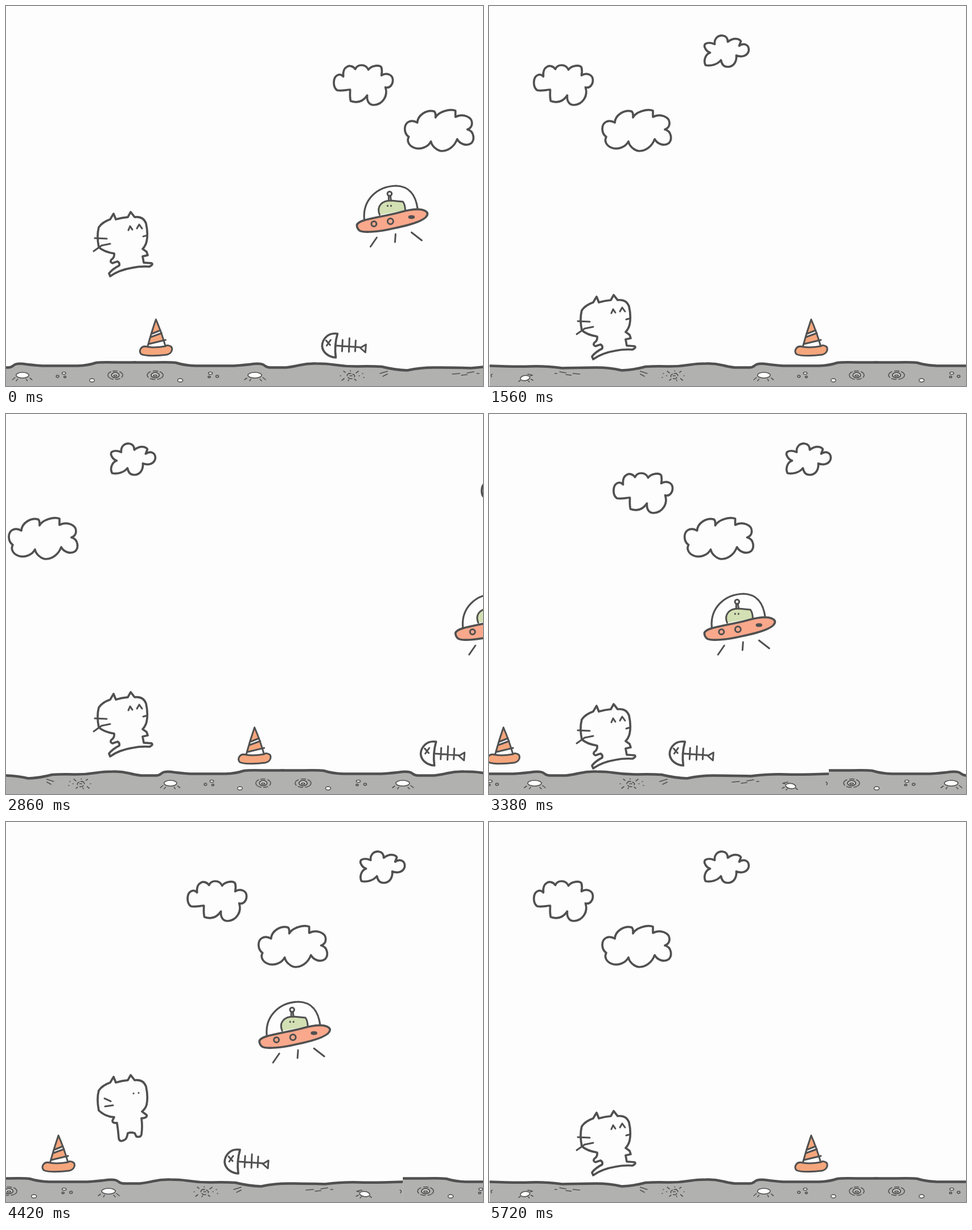
Write an HTML page that moves like this. It is 838 px wide and 668 px high and loops after 5850 ms.

```html
<!DOCTYPE html>
<html lang="en">
<head>
<meta charset="utf-8">
<title>Moon run</title>
<style>
  html, body { margin: 0; width: 838px; height: 668px; overflow: hidden; background: #fdfdfd; }
  svg { display: block; }
  .ink { fill: none; stroke: #505050; stroke-width: 3.7; stroke-linecap: round; stroke-linejoin: round; }
  .fine { stroke-width: 3; }
  .thin { stroke-width: 1.6; }
  .paper { fill: #fdfdfd; }
  .orange { fill: #f5a67c; }
  .red { fill: #f9a88c; }
  .green { fill: #d3e0b3; }
  .dark { fill: #505050; }
  .soil { fill: #b1b1b0; }
</style>
</head>
<body>
<svg width="838" height="668" viewBox="0 0 838 668">
  <defs>
    <!-- one half of the ground; x = 0 is its ring crater -->
    <g id="half" class="ink">
      <path class="soil" stroke="none" d="M-40 670V627H36L71 632H138L174 629L200 635H230L253 632L283 628L313 630L358 633H398L443 640L490 636H555L615 633L692 632V670Z"/>
      <path stroke-width="4.500" stroke-linecap="butt" d="M-40 626.500H0Q28 626 36 627Q52 632 71 632.500H138Q160 631 174 629Q188 628 192 632Q197 636 204 635.500H230Q240 634.500 253 631.500Q268 628 283 628.500Q300 628.500 313 630.500Q336 634 358 633.500T398 634Q422 640 443 640.500Q466 635.500 490 635.500T555 636.500Q590 632.500 615 633.500T692 632.500"/>
      <g class="thin">
        <ellipse cy="649" rx="14" ry="7.500" stroke-dasharray="13 5 8 4"/>
        <ellipse class="paper" cy="649" rx="7" ry="4.500" stroke-width="2.200"/>
        <ellipse class="soil" cy="649.500" rx="3.500" ry="1.500"/>
        <ellipse class="paper" cx="44" cy="658" rx="4.500" ry="3"/>
        <ellipse class="paper" cx="97" cy="645.500" rx="3.500" ry="2"/>
        <ellipse cx="95" cy="652" rx="2" ry="1.500"/>
        <ellipse cx="109" cy="651" rx="2.500" ry="2"/>
        <ellipse class="paper" cx="175" cy="649" rx="12" ry="5"/>
        <path d="M161 654L157 657M168 656L166 659M184 656L187 659M189 653L194 657"/>
        <path d="M337 650Q338 645 344 646M347 647Q352 649 350 652M346 655Q341 656 339 653M342 650H346M334 644L331 642M343 642V641M353 645L357 642M332 655L328 658M340 657L339 659M350 656L353 658M325 650H326M358 650H359M364 646H365M366 653H367"/>
        <path d="M395 646L408 642M400 651L408 647"/>
        <path d="M522 647L535 646M538 649L548 648M548 645L560 643M565 646H569"/>
        <ellipse class="paper" cx="625" cy="654" rx="9" ry="4.500" transform="rotate(8 625 654)"/>
        <path d="M614 656L610 658M619 659L617 661M634 658L637 660M615 650L611 649L620 647"/>
        <path d="M687 647Q691 649 688 652"/>
      </g>
    </g>
  </defs>

  <g id="clouds" class="ink">
    <path class="paper" d="M605 147C595 148 588 150 582 148C574 142 575 126 582 122C587 119 590 121 593 124C591 106 606 100 614 111C618 102 632 101 637 112C643 104 657 103 660 108C661 112 661 117 660 122C669 116 680 121 680 130C680 139 674 145 667 143C672 158 662 173 647 174C638 174 634 167 635 157C629 166 620 172 606 167C604 160 605 154 605 147Z"/>
    <path class="paper" d="M708 230C699 224 699 209 707 204C712 201 718 202 723 205C724 191 740 182 752 185C756 187 755 192 755 196C760 186 780 180 790 184L790 195C803 188 820 195 819 207C819 212 815 216 811 217C823 220 824 235 818 241C810 247 798 243 793 234C788 248 776 255 766 255C756 254 748 245 747 238C742 248 730 252 720 250C708 247 704 237 708 230Z"/>
    <path class="paper" d="M389 82C382 80 377 71 380 67C385 63 392 65 397 67C396 56 404 51 411 52C418 53 420 58 420 63C430 55 440 57 443 62L440 70C448 64 457 68 457 77C456 87 446 91 435 87C436 98 430 107 420 107C412 107 409 101 408 95C402 103 390 106 381 104C377 97 380 85 389 82Z"/>
  </g>

  <use id="next" href="#half"/>
  <g id="ground">
    <use href="#half" transform="translate(-70) scale(-.932 1)"/>
    <use href="#half"/>
  </g>

  <!-- x = 0 is the centre of the cone -->
  <g id="props" class="ink">
    <path class="orange" stroke="none" d="M0 552L-15 600H18Z"/>
    <path class="paper" stroke="none" d="M-7 576L8 570L10 574L-9 581ZM-13 594L16 587L18 599H-15Z"/>
    <path class="fine" d="M-15 600Q-8 574 0 551Q10 574 17 599M-7 576L8 570M-9 582L10 575M-12 594L17 587"/>
    <path class="orange fine" d="M-15 599C-26 596 -31 606 -26 612C-18 616 5 615 19 613C28 611 30 603 27 599C23 596 19 596 17 598C6 600 -5 601 -15 599Z"/>

    <path class="paper" d="M318 576C302 574 292 586 292 598C293 609 303 617 316 618C314 604 315 590 319 576Z"/>
    <path class="fine" d="M299 588L306 596M307 587L300 597M317 597L359 600M328 587L327 607M340 584L339 608M351 588L350 607M359 601L369 595L368 609Z"/>

    <g transform="translate(-263)">
      <path class="paper" stroke-width="3.200" d="M629 375C626 341 651 317 685 316C710 317 720 334 723 358"/>
      <path class="green fine" d="M656 367C650 352 660 342 676 342L697 344Q701 350 701 359"/>
      <path class="fine" d="M672 342V334M676 342L675 334"/>
      <circle class="fine" cx="673.500" cy="330" r="3.800"/>
      <path class="fine" d="M670 351V351.500M676 351V351.500"/>
      <path class="red" d="M616 385C619 375 650 373 690 363C715 356 735 355 740 364C742 375 715 384 680 391C655 397 628 399 621 395C617 392 616 389 616 385Z"/>
      <circle class="fine" cx="646" cy="383" r="4.500"/>
      <circle class="fine" cx="675" cy="378.500" r="5"/>
      <ellipse class="dark" cx="712" cy="371" rx="4" ry="1.500"/>
      <path class="fine" d="M651 407L640 423M684 401L683 415M712 398L730 412"/>
    </g>
  </g>

  <g id="cat" class="ink">
    <g id="run">
      <path class="paper" d="M190 581Q172 578 163 570Q159 550 163 535Q169 526 183 521L189 511L193 521Q203 518 214 517L219 508L226 517Q241 515 246 528Q250 546 247 560Q245 568 240 573L247 578L249 584L240 586L242 597L256 598Q259 601 252 604Q236 603 222 606Q198 610 183 621L181 616Q186 609 199 602Q200 597 196 595L187 598Q182 596 185 592Q191 588 190 581Z"/>
      <path class="fine" d="M156 554L177 555M154 577L168 567L183 564M215 540L218 533L222 539M230 537L234 530L239 537M241 551L248 549"/>
    </g>
    <g id="stand">
      <path class="paper" d="M190 582Q174 581 163 570Q159 550 163 535Q169 526 183 521L189 511L193 521Q203 518 214 517L219 508L226 517Q241 515 246 528Q250 546 247 560Q245 567 239 572L247 578Q249 583 238 584Q240 598 238 612Q237 618 229 616L226 610Q220 608 214 610Q212 621 208 622Q199 627 198 618Q197 605 195 592Q187 593 187 588Z"/>
      <path class="fine" d="M173 549L184 554M174 563L188 561M224 540V540.300M233 539V539.300"/>
    </g>
  </g>
</svg>
<script>
const $ = id => document.getElementById(id);
const STEP = 130, STEPS = 45, CYCLE = 28;

// [step, beats run so far]; the course restarts every CYCLE beats
const pace = [[0, 14.01], [5, 30.99], [12, 56], [22, 89.99], [26, 109.03], [34, 133.94], [44, 168]];

// left edge as drawn, left edge at the start of the course, wrap distance
const clouds = [[575, 77.5, 951], [700, 198, 955.5], [378, 377.5, 955]];

function beatAt(step) {
  let i = 1;
  while (step > pace[i][0]) i++;
  const [s0, b0] = pace[i - 1], [s1, b1] = pace[i];
  return (b0 + (b1 - b0) * (step - s0) / (s1 - s0)) % CYCLE;
}

// steady climb, then free fall
function catY(b) {
  const top = 12.67, high = 147.7;
  if (b < 5) return 0;
  if (b < top) return -high * (b - 5) / (top - 5);
  return Math.min(2, 0.985 * (b - top) ** 2 - high);
}

const place = (el, x, y = 0) => el.setAttribute('transform', `translate(${x.toFixed(2)} ${y.toFixed(2)})`);
const show = (el, on) => el.setAttribute('visibility', on ? 'visible' : 'hidden');

function draw(ms) {
  const b = beatAt(Math.floor(ms / STEP) % STEPS);
  const shift = 32.4 * b;
  place($('ground'), 716 - shift);
  place($('next'), 1448 - shift);
  place($('props'), 566 - shift * 2 / 3);
  clouds.forEach(([drawn, start, wrap], i) => {
    const left = start - shift;
    place($('clouds').children[i], (left < 0 ? left + wrap : left) - drawn);
  });
  place($('cat'), 0, catY(b));
  const running = Math.round(b) % 6 < 3;
  show($('run'), running);
  show($('stand'), !running);
}

const begin = performance.now();
function tick() {
  draw(performance.now() - begin);
  requestAnimationFrame(tick);
}
tick();
</script>
</body>
</html>
```
